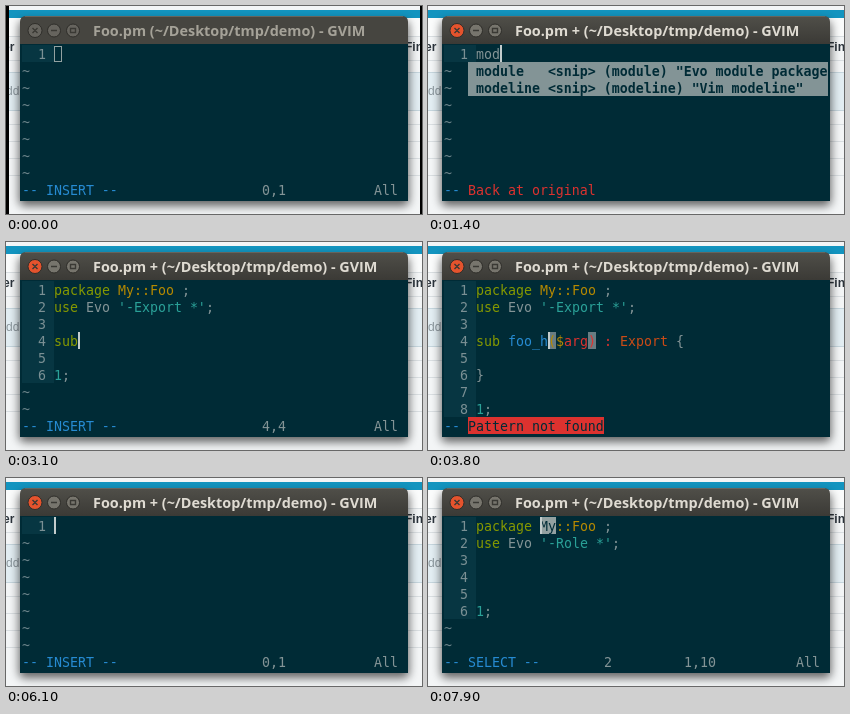
An HTML page that plays this animation: 416 by 208 pixels, repeating every 8 s.

```html
<!DOCTYPE html>
<html lang="en">
<head>
<meta charset="utf-8">
<title>Snippet demo</title>
<style>
  html, body { margin: 0; width: 100%; height: 100%; overflow: hidden; background: #f3f5f6; }
  svg { display: block; width: 416px; height: 208px; }
  text { white-space: pre; }
  .page { font: bold 12px "Liberation Sans", Arial, sans-serif; fill: #2b333b; }
  .page .faint { font-weight: normal; fill: #8b969c; }
  #title { font: bold 14.4px "Open Sans", sans-serif; fill: #dfdbd2; }
  #term { font: 13.288px "DejaVu Sans Mono", monospace; }
  .btn { fill: #77756d; stroke: #2f2e2a; }
  #close { fill: #e5532d; }
  .sign { fill: none; stroke: #3a3934; stroke-width: 1.4; }
  .blur #bar { fill: #464540; }
  .blur #title { fill: #a5a298; }
  .blur .btn, .blur #close { fill: #66645e; }
  #frame { display: none; }
  .blur #frame { display: block; }
</style>
</head>
<body>
<svg id="stage" viewBox="0 0 416 208">
  <defs>
    <linearGradient id="metal" x2="0" y2="1">
      <stop offset="0" stop-color="#504f49"/>
      <stop offset="1" stop-color="#3a3935"/>
    </linearGradient>
    <filter id="soft" x="-20%" y="-20%" width="140%" height="150%">
      <feGaussianBlur stdDeviation="5"/>
    </filter>
    <clipPath id="inner"><rect x="14" y="38" width="386" height="157"/></clipPath>
  </defs>

  <g class="page">
    <rect width="416" height="208" fill="#f3f5f6"/>
    <rect y="4" width="416" height="8" fill="#1394bf"/>
    <rect y="12" width="416" height="18" fill="#fafbfb"/>
    <path d="M0 30.5H416M0 54.5H416M0 118.5H416M0 135.5H416M0 152.5H416M0 169.5H416" stroke="#d9dee1"/>
    <rect y="66" width="416" height="38" fill="#e2edf2"/>
    <path d="M0 66.5H416M0 104.5H416" stroke="#c5d5dd"/>
    <text x="-3" y="45">er</text>
    <text x="399" y="45">Fin</text>
    <text x="0" y="89" class="faint">dd</text>
  </g>

  <rect x="13" y="15" width="390" height="185" rx="5" filter="url(#soft)" opacity=".6"/>
  <path id="bar" d="M14 39V16q0-6 6-6H396q6 0 6 6V39Z" fill="url(#metal)"/>
  <path d="M19 10.5H397" stroke="#66645d"/>
  <circle id="close" class="btn" cx="29" cy="24.5" r="7"/>
  <circle class="btn" cx="48" cy="24.5" r="6.5"/>
  <circle class="btn" cx="67" cy="24.5" r="6.5"/>
  <path class="sign" d="M26.5 22l5 5m0-5l-5 5M45 24.5h6M64.5 22.5h5v4h-5z"/>
  <text id="title" x="87" y="30"></text>
  <rect x="14" y="38" width="388" height="157" fill="#002b36"/>
  <g id="term" clip-path="url(#inner)"></g>

  <path id="frame" d="M0 0H3V208H0ZM414 0H416V208H414Z"/>
</svg>

<script>
const LOOP = 8000, CELL = 8, ROW = 17, LEFT = 16, TOP = 39, GUTTER = 4;
const INK = {
  w: '#839496', g: '#859900', y: '#b58900', b: '#268bd2', c: '#2aa198',
  r: '#dc322f', o: '#cb4b16', n: '#7b9094', t: '#6b838a', d: '#002b36'
};
const term = document.getElementById('term');
const title = document.getElementById('title');
const stage = document.getElementById('stage');

function add(tag, attrs, text) {
  const el = document.createElementNS('http://www.w3.org/2000/svg', tag);
  for (const k in attrs) el.setAttribute(k, attrs[k]);
  if (text) el.textContent = text;
  term.append(el);
  return el;
}
const px = col => LEFT + col * CELL;
const py = row => TOP + row * ROW;
const block = (col, row, cols, fill) =>
  add('rect', { x: px(col), y: py(row), width: cols * CELL, height: ROW, fill });
const write = (col, row, text, ink, weight = 'normal') =>
  add('text', { x: px(col), y: py(row) + 14, fill: INK[ink], 'font-weight': weight }, text);

// "{g}sub {b}name" switches ink at each brace tag
function rich(col, row, line) {
  for (const [, ink, text] of line.matchAll(/\{(\w)\}((?:(?!\{\w\}).)*)/g)) {
    write(col, row, text, ink);
    col += text.length;
  }
}

const pack = '{g}package {y}My::Foo{w} ;';
const head = use => [pack, "{g}use{w} Evo {c}'" + use + " *'{w};", ''];
const end = '{c}1{w};';
const module = (...body) => [...head('-Export'), ...body, '', end];
const sub = name => module('{g}sub {b}' + name + '{y}($' + '{r}arg) : {o}Export{w} {', '', '{w}}');

const insert = pos => ({ mode: '-- INSERT --', pos });
const select = { mode: '-- SELECT --', pos: '1,10', count: '2' };
const back = { mode: '--', note: 'Back at original' };
const missing = { mode: '--', alert: 'Pattern not found' };
const modMenu = [
  'module   <snip> (module) "Evo module package"',
  'modeline <snip> (modeline) "Vim modeline"'
];
const roleMenu = ['rolep <snip> (rolep) "Evo role package"'];

// time, lines, cursor [row, col], status, extras
const steps = [
  [0, [''], [0, 0], insert('0,1'), { blur: true, clean: true }],
  [100, [''], [0, 0], insert('0,1'), { clean: true }],
  [900, ['{w}m'], [0, 1], insert('1,2')],
  [1100, ['{w}mo'], [0, 2], back, { menu: modMenu }],
  [1300, ['{w}mod'], [0, 3], back, { menu: modMenu }],
  [1900, module(''), [0, 8], select, { mark: true }],
  [2500, module(''), [3, 0], insert('4,1')],
  [2700, module('{w}s'), [3, 1], insert('4,2')],
  [2800, module('{w}su'), [3, 2], insert('4,3')],
  [2900, module('{g}sub'), [3, 3], insert('4,4')]
];
[...'foo_hello'].forEach((_, i, all) => {
  const name = all.slice(0, i + 1).join('');
  steps.push([3300 + i * 100 + (i > 4 ? 100 : 0), sub(name), [3, 4 + name.length], missing, { paren: true }]);
});
steps.push(
  [4300, sub('foo_hello'), [4, 2], insert('5,3')],
  [5900, [''], [0, 0], insert('0,1')],
  [6600, ['{w}r'], [0, 1], insert('1,2')],
  [6800, ['{w}ro'], [0, 2], back, { menu: roleMenu }],
  [7400, [...head('-Role'), '', '', end], [0, 8], select, { mark: true }]
);

function draw([, lines, [row, col], status, extra = {}]) {
  term.replaceChildren();
  stage.classList.toggle('blur', !!extra.blur);
  title.textContent = 'Foo.pm ' + (extra.clean ? '' : '+ ') + '(~/Desktop/tmp/demo) - GVIM';

  for (let r = 0; r < 8; r++) {
    if (r >= lines.length) { write(0, r, '~', 't'); continue; }
    block(0, r, GUTTER, '#073642');
    write(2, r, String(r + 1), 'n');
    if (extra.paren && r === row) {
      block(GUTTER + col, r, 1, '#687c82');
      block(GUTTER + col + 5, r, 1, '#687c82');
    }
    rich(GUTTER, r, lines[r]);
  }
  if (extra.mark) {
    block(GUTTER + col, row, 2, '#93a1a1');
    write(GUTTER + col, row, 'My', 'd');
  }
  (extra.menu || []).forEach((item, i, all) => {
    const width = Math.max(...all.map(s => s.length)) + 2;
    block(3, row + 1 + i, width, '#839496');
    write(4, row + 1 + i, item, 'd', 'bold');
  });

  write(0, 8, status.mode, 'b');
  if (status.note) write(3, 8, status.note, 'r');
  if (status.alert) {
    block(3, 8, status.alert.length, INK.r);
    write(3, 8, status.alert, 'd');
  }
  if (status.count) write(20, 8, status.count, 'w');
  if (status.pos) {
    write(30, 8, status.pos, 'w');
    write(44, 8, 'All', 'w');
  }

  const x = px(GUTTER + col), y = py(row);
  return extra.blur
    ? add('rect', { x: x + .5, y: y + 1.5, width: 7, height: 15, fill: 'none', stroke: '#93a1a1' })
    : add('rect', { x, y, width: 2, height: ROW, fill: '#c3cccc' });
}

let shown, caret;
function tick(now) {
  const t = now % LOOP;
  const step = steps.findLast(s => s[0] <= t);
  if (step !== shown) caret = draw(shown = step);
  // solid for 700 ms, then 250 off / 400 on
  const idle = t - step[0] - 700;
  caret.style.visibility = idle >= 0 && idle % 650 < 250 ? 'hidden' : 'visible';
  requestAnimationFrame(tick);
}
tick(performance.now());
</script>
</body>
</html>
```
